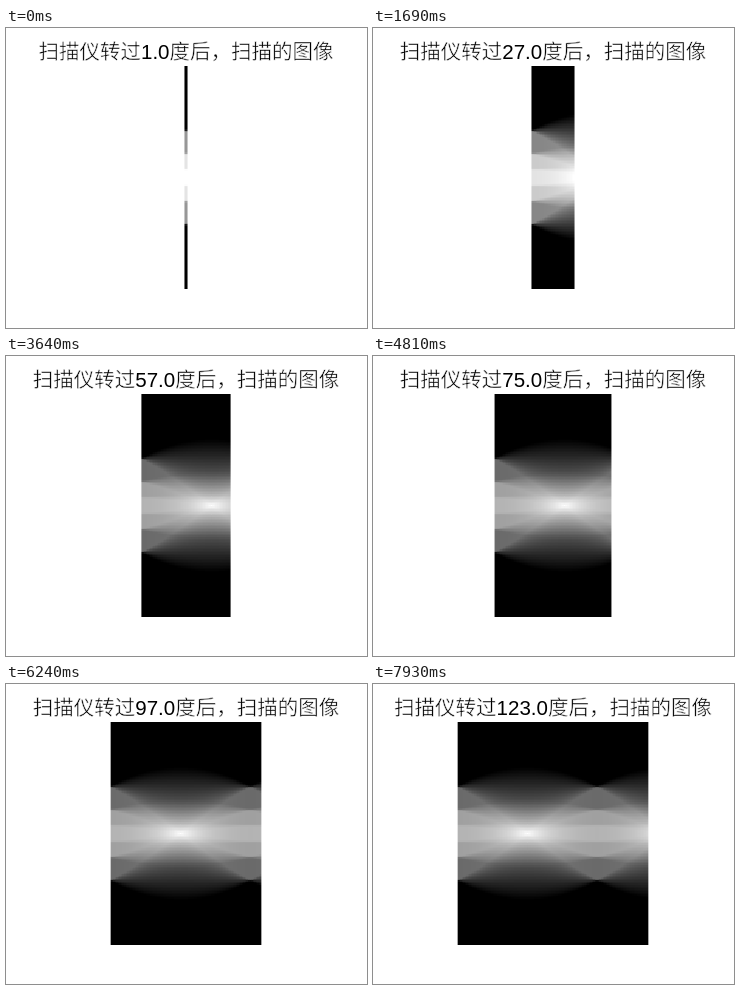
Write an HTML page with a canvas that moves like this. It is 361 by 300 pixels and loops after 8000 ms.

```html
<!DOCTYPE html>
<html lang="zh-CN">
<head>
<meta charset="utf-8">
<title>扫描图像</title>
<style>
  html, body { margin: 0; width: 100%; height: 100%; overflow: hidden; background: #fff; }
  .stage { position: absolute; left: 0; top: 0; width: 361px; height: 300px; }
  text { font: 20.5px "Liberation Sans", "Noto Sans CJK SC", sans-serif; text-anchor: middle; }
  /* a white outline thins the strokes of the characters */
  .thin { stroke: #fff; stroke-width: 0.5px; }
</style>
</head>
<body>
<canvas class="stage" width="361" height="300"></canvas>
<svg class="stage" viewBox="0 0 361 300"><text x="180" y="31"><tspan class="thin">扫描仪转过</tspan><tspan id="angle">1.0</tspan><tspan class="thin">度后，扫描的图像</tspan></text></svg>
<script>
const LOOP = 8000, STEP = 130, LAST_STEP = 61;
const ANGLES = 124, ROWS = 145, MID = 72;
const WIDTH = 361, CENTER = 180, TOP = 38, HEIGHT = 223;

const ctx = document.querySelector('canvas').getContext('2d');
const label = document.getElementById('angle');

// Three nested squares, each adding one unit of density.
function density(x, y) {
  const d = Math.max(Math.abs(x), Math.abs(y));
  return (d <= 30) + (d <= 15) + (d <= 5);
}

// Projection at one angle: every pixel is split into four,
// each quarter shared between its two nearest bins.
function project(degrees) {
  const c = Math.cos(degrees * Math.PI / 180);
  const s = Math.sin(degrees * Math.PI / 180);
  const bins = new Float64Array(ROWS);
  for (let x = -30; x <= 30; x++) {
    for (let y = -30; y <= 30; y++) {
      const part = density(x, y) / 4;
      for (const dx of [-0.25, 0.25]) {
        for (const dy of [-0.25, 0.25]) {
          const r = (x + dx) * c + (y + dy) * s + MID;
          const i = Math.floor(r);
          bins[i] += part * (i + 1 - r);
          bins[i + 1] += part * (r - i);
        }
      }
    }
  }
  return bins;
}

const scans = Array.from({ length: ANGLES }, (_, a) => project(a));
const peaks = scans.map(bins => Math.max(...bins));

const buffer = document.createElement('canvas');
buffer.width = ANGLES;
buffer.height = ROWS;
const bufferCtx = buffer.getContext('2d');

function draw(step) {
  const angle = 1 + 2 * step;
  const cols = angle + 1;
  const peak = Math.max(...peaks.slice(0, cols));
  const image = bufferCtx.createImageData(cols, ROWS);
  for (let row = 0; row < ROWS; row++) {
    for (let col = 0; col < cols; col++) {
      const v = Math.round(255 * scans[col][row] / peak);
      image.data.set([v, v, v, 255], 4 * (row * cols + col));
    }
  }
  bufferCtx.putImageData(image, 0, 0);

  // Draw on whole pixels, then trim both sides to the exact width.
  const half = cols * HEIGHT / ROWS / 2;
  const outer = Math.ceil(half);
  ctx.imageSmoothingEnabled = false;
  ctx.drawImage(buffer, 0, 0, cols, ROWS, CENTER - outer, TOP, 2 * outer, HEIGHT);
  ctx.fillStyle = '#fff';
  ctx.fillRect(0, 0, CENTER - half, 300);
  ctx.fillRect(CENTER + half, 0, WIDTH - CENTER - half, 300);
  label.textContent = angle.toFixed(1);
}

const start = performance.now();
let shown = -1;
function tick() {
  const time = (performance.now() - start) % LOOP;
  const step = Math.min(LAST_STEP, Math.floor(time / STEP));
  if (step !== shown) draw(shown = step);
  requestAnimationFrame(tick);
}
tick();
</script>
</body>
</html>
```
